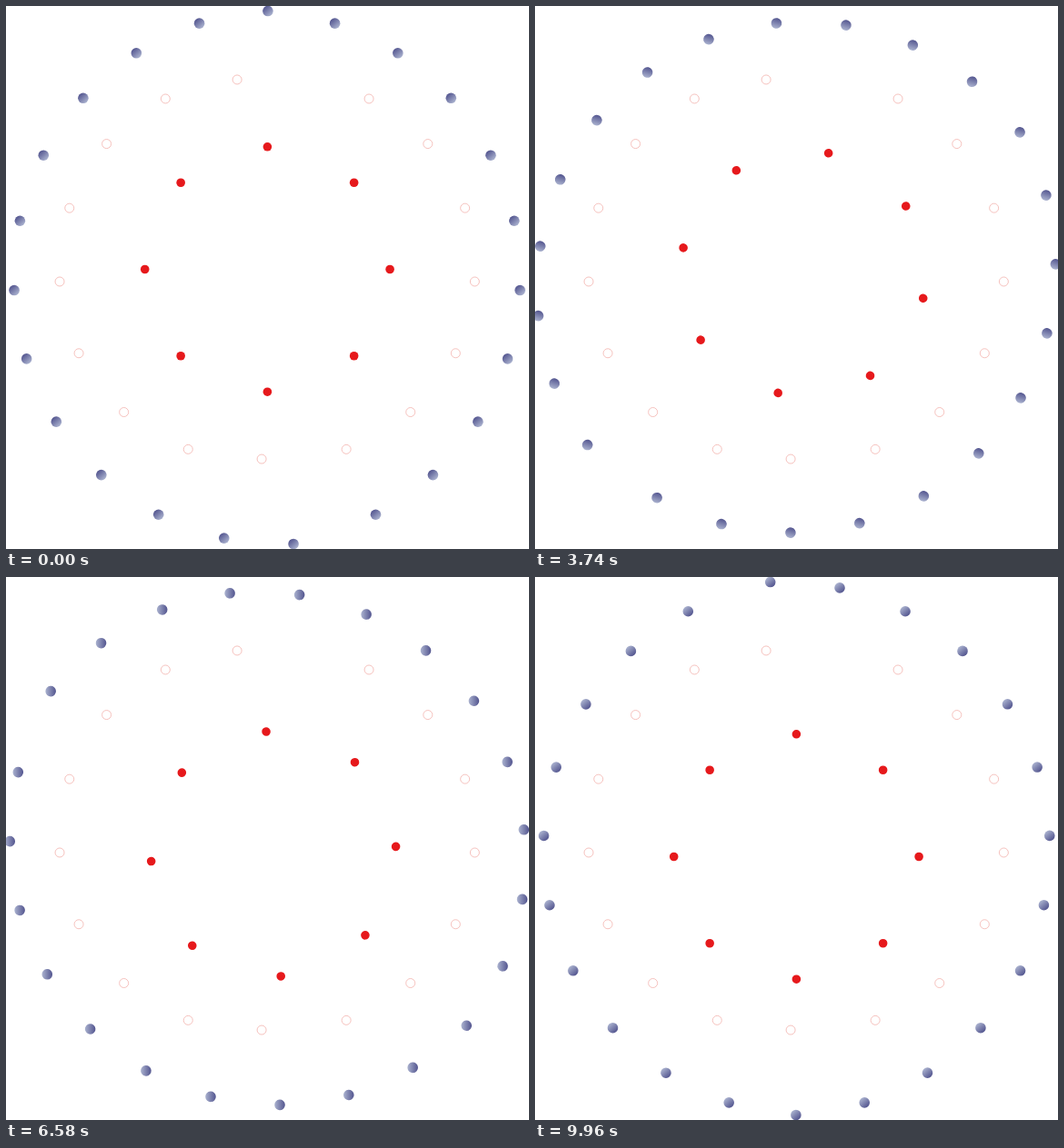
Write an HTML page that moves like this. It is 575 px wide and 597 px high and loops after 10 s.

```html
<!DOCTYPE html>
<html lang="en">
<head>
<meta charset="utf-8">
<title>Turning rings</title>
<style>
  html, body { margin: 0; width: 100%; height: 100%; overflow: hidden; background: #fff; }
  svg { display: block; width: 100%; height: 100%; }
  .pink { fill: none; stroke: #f4bab6; stroke-width: .9; }
  .blue { fill: url(#shade); }
  .red { fill: #e6191c; }
</style>
</head>
<body>
<svg viewBox="0 0 575 597">
  <defs>
    <linearGradient id="shade" x1=".15" y1=".1" x2=".85" y2=".9">
      <stop offset="0" stop-color="#50528d"/>
      <stop offset="1" stop-color="#adb5d1"/>
    </linearGradient>
  </defs>
  <g id="still"></g>
  <g id="turning"></g>
</svg>
<script>
const LOOP = 10000, STEP = 20, STEPS = 499;
const PIVOT = { x: 287.4, y: 298.5 };
const still = document.getElementById('still');
const turning = document.getElementById('turning');

function dot(parent, type, x, y, r) {
  const circle = document.createElementNS('http://www.w3.org/2000/svg', 'circle');
  const attributes = { class: type, cx: x.toFixed(2), cy: y.toFixed(2), r };
  for (const name in attributes) circle.setAttribute(name, attributes[name]);
  parent.append(circle);
}

// Dots first..last along a circle; side -1 runs down the left, 1 down the right.
function arc(parent, type, { cx, cy, radius, count, start = 0, size }, side, first, last) {
  for (let k = first; k <= last; k++) {
    const angle = (start + k * 360 / count) * Math.PI / 180;
    dot(parent, type, cx + side * radius * Math.sin(angle), cy - radius * Math.cos(angle), size);
  }
}

const pink = { cy: 289.5, radius: 209, count: 16, start: 3.7, size: 5 };
arc(still, 'pink', { ...pink, cx: 267.6 }, -1, 0, 8);
arc(still, 'pink', { ...pink, cx: 306.8 }, 1, 1, 7);

const blue = { cy: PIVOT.y, radius: 293.3, count: 24, start: 2.75, size: 5.8 };
arc(turning, 'blue', { ...blue, cx: 302 }, -1, 0, 12);
arc(turning, 'blue', { ...blue, cx: 272.2 }, 1, 1, 10);

arc(turning, 'red', { cx: 287.4, cy: 289.5, radius: 134.7, count: 8, size: 4.8 }, 1, 0, 7);

function draw() {
  const t = Math.floor(performance.now() % LOOP / STEP) / STEPS;
  const eased = t * t * (3 - 2 * t);
  turning.setAttribute('transform', `rotate(${180 * eased} ${PIVOT.x} ${PIVOT.y})`);
  requestAnimationFrame(draw);
}
draw();
</script>
</body>
</html>
```
